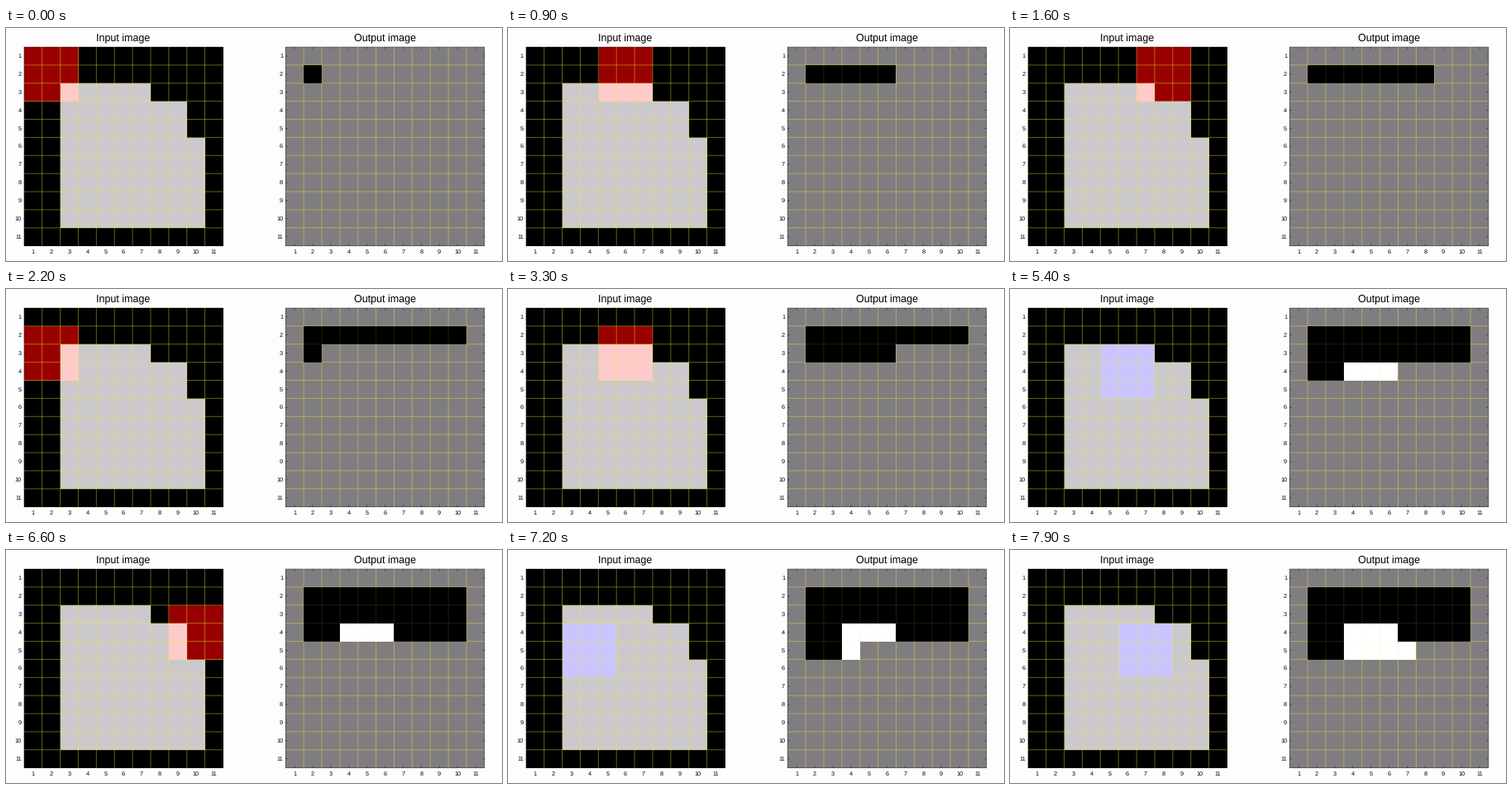
A matplotlib script that plays this animation: 600x282 px, repeating every 8 s.

```python
"""Binary erosion: a 3x3 window scans the input and fills the output."""
import numpy as np
import matplotlib.pyplot as plt
from matplotlib.animation import FuncAnimation
from matplotlib.collections import LineCollection
from matplotlib.patches import Rectangle

W, H, DPI = 600, 282, 64
PT = 72 / DPI  # points per pixel
N, SIDE, TOP = 11, 240.7, 23
CELL = SIDE / N
FRAMES, INTERVAL = 80, 100

BLACK = (0, 0, 0)
WHITE = (255, 255, 255)
PALE = (204, 201, 204)
GREY = (128, 125, 128)
RED = (153, 0, 0)
PINK = (255, 202, 202)
BLUE = (203, 197, 255)

mask = np.zeros((N, N), bool)
mask[2, 2:7] = True
mask[3:5, 2:9] = True
mask[5:10, 2:10] = True

plt.rcParams.update({"font.family": "Liberation Sans", "path.snap": False,
                     "text.hinting": "none"})
fig = plt.figure(figsize=(W / DPI, H / DPI), dpi=DPI, facecolor="#fefdfe")
ax = fig.add_axes([0, 0, 1, 1])
ax.axis("off")


def grid(x0, y0):
    at = np.arange(1, N) * CELL
    return ([[(x0 + d, y0), (x0 + d, y0 + SIDE)] for d in at]
            + [[(x0, y0 + d), (x0 + SIDE, y0 + d)] for d in at])


def ticks(x0, y0, size=2.5):
    x1, y1 = x0 + SIDE, y0 + SIDE
    segs = []
    for k in range(N):
        d = (k + 0.5) * CELL
        segs += [[(x0 + d, y0), (x0 + d, y0 + size)],
                 [(x0 + d, y1), (x0 + d, y1 - size)],
                 [(x0, y0 + d), (x0 + size, y0 + d)],
                 [(x1, y0 + d), (x1 - size, y0 + d)]]
    return segs


def cells(x0, zorder=0):
    return ax.imshow(np.zeros((N, N, 4), np.uint8), aspect="auto",
                     interpolation="nearest", zorder=zorder,
                     extent=(x0, x0 + SIDE, TOP + SIDE, TOP))


def label(x, y, text, size, ha="center"):
    ax.text(x, y, text, fontsize=size * PT, ha=ha, va="baseline")


def panel(x0, title):
    ax.add_collection(LineCollection(ticks(x0, TOP), colors="black",
                                     linewidths=0.7 * PT, alpha=0.6))
    ax.add_collection(LineCollection(grid(x0, TOP), colors="#ebeb3c",
                                     linewidths=PT, alpha=0.42))
    ax.add_patch(Rectangle((x0, TOP), SIDE, SIDE, fill=False, ec="black",
                           lw=0.7 * PT, alpha=0.5))
    label(x0 + SIDE / 2, 16.3, title, 12.5)
    for k in range(N):
        d = (k + 0.5) * CELL
        label(x0 + d, 272.9, k + 1, 7.4)
        label(x0 - 3, TOP + d + 2, k + 1, 7.4, "right")
    return cells(x0)


source = panel(21.8, "Input image")
result = panel(338.2, "Output image")
veil = cells(338.2, zorder=2.5)  # finished cells dim the grid
ax.set_xlim(0, W)
ax.set_ylim(H, 0)


def window(step):
    r, c = divmod(step, N - 2)
    return slice(r, r + 3), slice(c, c + 3)


def update(i):
    step = (4 * i + 5) // 10  # one move every 250 ms
    left = np.where(mask[..., None], PALE, BLACK)
    area = window(step)
    hit = mask[area].all()
    left[area] = np.where(mask[area][..., None], BLUE if hit else PINK, RED)

    right = np.full((N, N, 3), GREY)
    cover = np.zeros((N, N, 1))
    for s in range(step + 1):
        r, c = divmod(s, N - 2)
        right[r + 1, c + 1] = WHITE if mask[window(s)].all() else BLACK
        cover[r + 1, c + 1] = 180

    source.set_data(left.astype(np.uint8))
    result.set_data(right.astype(np.uint8))
    veil.set_data(np.concatenate([right, cover], axis=2).astype(np.uint8))
    return source, result, veil


anim = FuncAnimation(fig, update, frames=FRAMES, interval=INTERVAL,
                     repeat=True, repeat_delay=0)
plt.show()
```
